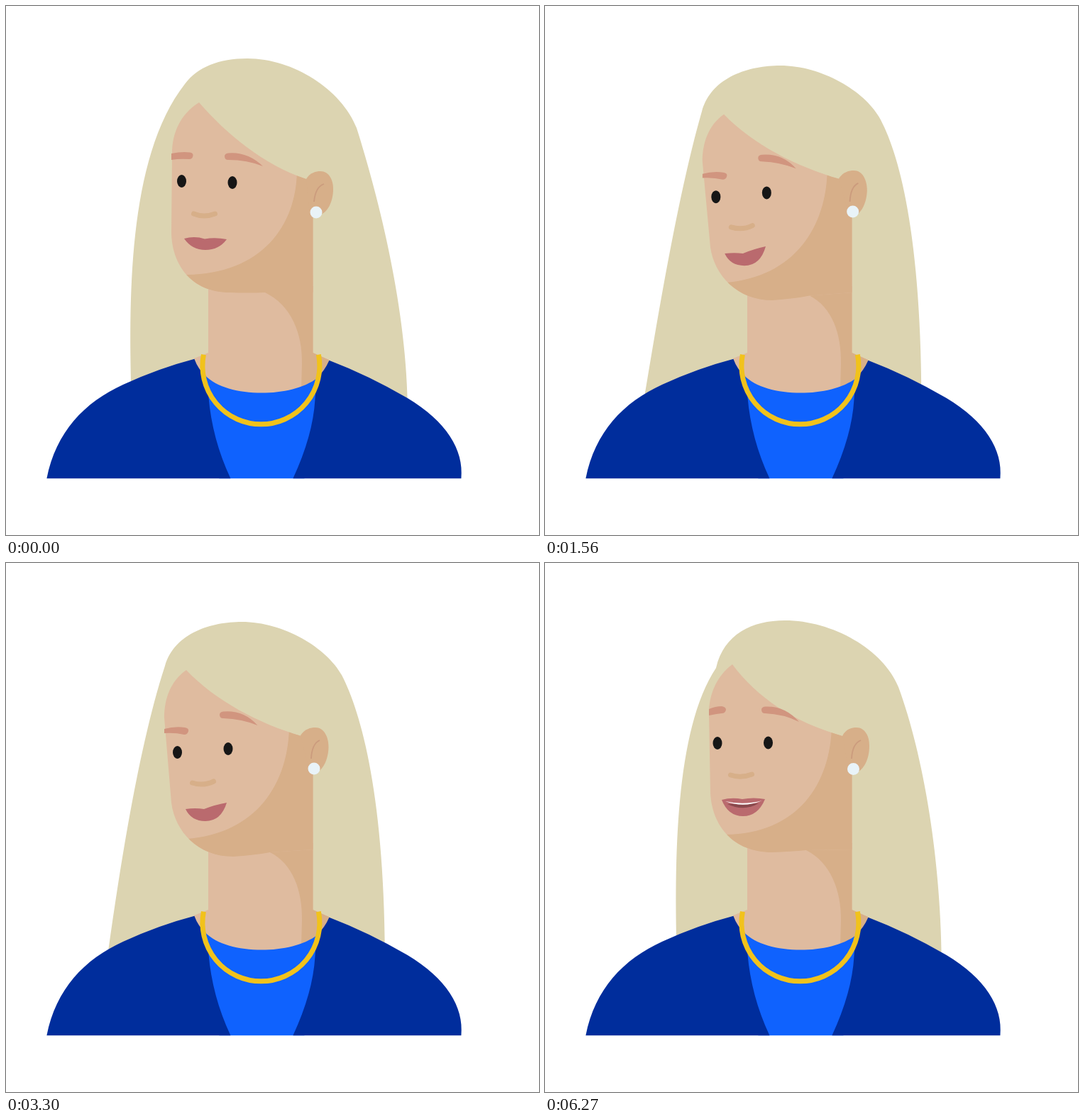
Animation, 751 px wide and 746 px high, one loop 8 s. Source, as an HTML page with a canvas:

```html
<!DOCTYPE html>
<html lang="en">
<head>
<meta charset="utf-8">
<title>Portrait</title>
<style>
  html, body { margin: 0; width: 100%; height: 100%; overflow: hidden; background: #fff; }
  canvas { display: block; }
</style>
</head>
<body>
<canvas id="stage" width="751" height="746"></canvas>
<script>
const ctx = document.getElementById('stage').getContext('2d');
const LOOP = 8000, STEP = 30;

const HAIR = '#dcd4b1', SKIN = '#dfbb9f', SHADE = '#d7af89', BROW = '#d1957f', LIPS = '#ba6a6e',
  EYE = '#161616', PEARL = '#e9f3f8', JACKET = '#002d9c', SHIRT = '#0f62fe', GOLD = '#f1c21b';

// Each moving part: upright, nodding, lifted, and optionally nodding while speaking.
const parts = {
  hair: [
    'M177 560 C173 420 170 215 252 110 C270 86 300 74 340 74 C405 74 473 118 494 172 C525 270 566 430 566 575Z',
    'M142 563 C155 470 183 270 224 145 C238 98 290 83 332 83 C392 83 452 120 473 158 C500 210 535 330 534 575Z',
    'M186 560 C182 420 183 235 241 148 C252 100 292 81 338 81 C405 81 477 122 498 175 C533 270 559 420 559 575Z',
    'M142 563 C155 470 181 280 220 163 C228 100 288 83 331 83 C394 83 458 120 478 163 C505 217 537 335 534 575Z'],
  face: [
    'M272 136 C245 153 234 180 234 208 L233 318 C233 365 262 404 315 404 Q340 405 365 404 L432.5 404 L432.5 250 L423 244 C363 224 310 180 272 136Z',
    'M254 151 C231 167 223 193 223 218 L233 338 C238 378 270 414 320 414 Q350 412 372 408 L432.5 404 L432.5 250 L416 244 C355 226 295 194 254 151Z',
    'M264 143 C241 160 231 187 231 212 L233 324 C235 370 265 408 320 408 Q347 407 368 405 L432.5 404 L432.5 250 L419 244 C350 224 299 190 264 143Z'],
  faceShade: [
    'M254 379 C360 378 410 310 410 230 L440 230 L440 420 L240 420Z',
    'M254 389 C352 382 398 312 399 230 L440 230 L440 420 L240 420Z',
    'M254 383 C356 382 402 312 404 230 L440 230 L440 420 L240 420Z'],
  neckShade: [
    'M365 404 C402 422 418 462 417 505 L416 540 L470 540 L455 499 L432.5 489 L432.5 395Z',
    'M372 408 C404 424 418 462 417 505 L416 540 L470 540 L455 499 L432.5 489 L432.5 395Z',
    'M368 405 C402 422 418 462 417 505 L416 540 L470 540 L455 499 L432.5 489 L432.5 395Z'],
  ear: [
    'M423 244 C428 235 437 233 443 233 C455 233 461 245 461 258 C461 276 453 292 441 295 L428 296Z',
    'M415 243 C421 234 429 232 436 232 C448 232 454.5 245 454.5 260 C454 277 447 291 438 295 L428 296Z',
    'M419 244 C424 234 432 232 439 232 C451 232 457.5 245 457 258 C457 277 449 291 440 295 L428 296Z'],
  earFold: ['M434 276 Q436 255 448 251', 'M430 276 Q431 255 442 250', 'M432 276 Q433 255 445 250'],
  nose: ['M264.5 293 Q279 299 294.5 293', 'M262.5 310 Q278 315 292.5 308', 'M261.5 299 Q276 304 291.5 298'],
  leftBrow: [
    'M233 208 Q248 205 259 206.5 Q264 207 263.5 211 Q263 216 258 216 Q245 215 233 217Z',
    'M223 234 Q238 230 252 232 Q258 233 257 237 Q256 242 251 242 Q238 239 223 240Z',
    'M231 206 Q240 202 249 202 Q255 203 255 207 Q254 212 249 212 Q240 213 231 215Z',
    'M222 222 Q234 216 244 216.5 Q250 217 250 221 Q249 225 244 225.5 Q234 227 223 231Z'],
  rightBrow: [
    'M313 207.5 Q340 205 362 226 Q340 217 313 217 Q308 217 308 212 Q308 208 313 207.5Z',
    'M306 209.5 Q335 207 354.5 229 Q333 220 306 219 Q301 219 301 214 Q301 210 306 209.5Z',
    'M310 202.5 Q338 201 358 224 Q336 213 310 212 Q305 212 305 207 Q305 203 310 202.5Z',
    'M305 212.5 Q334 210 354.5 232 Q332 222 305 222 Q300 222 300 217 Q300 213 305 212.5Z'],
  mouth: [
    'M251 328 Q266 324 280 328.5 Q295 326 311 329 Q300 344 281 344 Q262 344 251 328Z',
    'M253 347 Q267 345 279 347 Q294 341 311 338 Q303 364 281 364 Q261 364 253 347Z',
    'M249 334 Q263 330 278 333 Q294 330 310 333 Q300 357 279 357 Q258 357 249 334Z',
    'M252 347 Q266 342 280 345 Q296 342 311 343 Q302 367 281 367 Q260 367 252 347Z'],
  mouthInside: [
    'M257 335 Q280 346 301 334Z', 'M258 352 Q281 361 303 349Z', 'M257 340 Q280 351 301 339Z'],
  teeth: [
    'M254 331 Q280 337 306 330 Q280 341 254 331Z',
    'M255 348 Q281 354 308 345 Q281 358 255 348Z',
    'M254 336 Q280 342 306 335 Q280 346 254 336Z'],
  leftEye: ['247.5 247', '241.5 267', '243 254', '240.3 268'],
  rightEye: ['319 249', '313 262', '314.5 253.5', '311.8 262.8'],
  pearl: ['437 291', '434 290', '434.5 290.5']
};

const still = {
  neck: 'M285 380 H432.5 V489 L455 499 L460 560 H270 L265 497 L285 489Z',
  shirt: 'M280 520 C310 552 400 553 438 524 L450 560 L420 665.5 H300 L275 540Z',
  leftJacket: 'M57 665.5 C70 600 110 558 165 533 Q215 510 265 497 Q270 511 281 521 L285 550 Q290 610 316 665.5Z',
  rightJacket: 'M455 499 Q510 520 565 552 C620 585 645 625 641 665.5 H404 Q432 605 435 555 L437 525 Q449 513 455 499Z',
  necklace: 'M278 491 A82.5 82.5 0 1 0 440 491'
};

// Tracks of [time, value], eased between neighbours.
const nodTrack = [[210, 0], [700, -.19], [1150, 1.17], [1680, 1.1], [2130, 1.1], [2430, .65], [3060, 1.24], [3300, 1]];
const liftTrack = [[3990, 0], [4450, -.36], [4790, 1.54], [5430, 1]];
const speakTrack = [[3990, 0], [4450, 1]];
const eyeTrack = [[750, 1], [885, .1], [1020, 1], [6000, 1], [6135, .1], [6270, 1]];

const mix = (a, b, k) => a + (b - a) * k;

function valueAt(track, t) {
  const next = track.findIndex(key => key[0] > t);
  if (next === 0) return track[0][1];
  if (next < 0) return track[track.length - 1][1];
  const [t0, v0] = track[next - 1], [t1, v1] = track[next];
  return mix(v0, v1, (1 - Math.cos(Math.PI * (t - t0) / (t1 - t0))) / 2);
}

const NUMBER = /[\d.]+/g;
const numbers = text => text.match(NUMBER).map(Number);
const poses = Object.fromEntries(
  Object.entries(parts).map(([name, shapes]) => [name, shapes.map(numbers)]));

function fill(path, color) {
  ctx.fillStyle = color;
  ctx.fill(new Path2D(path));
}

function stroke(path, color, width, cap = 'butt') {
  ctx.strokeStyle = color;
  ctx.lineWidth = width;
  ctx.lineCap = cap;
  ctx.stroke(new Path2D(path));
}

function drawEye([x, y], open) {
  const rx = 6.5, ry = 9, h = ry * open, w = rx * Math.sqrt(1 - open * open);
  fill(`M${x - w} ${y - h} H${x + w} A${rx} ${ry} 0 0 1 ${x + w} ${y + h}
    H${x - w} A${rx} ${ry} 0 0 1 ${x - w} ${y - h}Z`, EYE);
}

function draw(t) {
  const nod = valueAt(nodTrack, t), lift = valueAt(liftTrack, t);
  const speak = valueAt(speakTrack, t), open = valueAt(eyeTrack, t);

  const coords = name => {
    const [upright, low, lifted, talking = low] = poses[name];
    return upright.map((v, i) =>
      mix(mix(v, mix(low[i], talking[i], speak), nod), lifted[i], lift));
  };
  const shape = name => {
    const values = coords(name);
    let i = 0;
    return parts[name][0].replace(NUMBER, () => values[i++].toFixed(2));
  };

  ctx.fillStyle = '#fff';
  ctx.fillRect(0, 0, 751, 746);

  fill(shape('hair'), HAIR);
  fill(still.neck, SKIN);
  fill(shape('neckShade'), SHADE);

  const face = shape('face');
  fill(face, SKIN);
  ctx.save();
  ctx.clip(new Path2D(face));
  fill(shape('faceShade'), SHADE);
  ctx.restore();

  fill(shape('ear'), SHADE);
  stroke(shape('earFold'), '#cb9b7d', 1.8);
  const [px, py] = coords('pearl');
  fill(`M${px - 8.5} ${py} a8.5 8.5 0 1 0 17 0 a8.5 8.5 0 1 0 -17 0Z`, PEARL);

  fill(shape('leftBrow'), BROW);
  fill(shape('rightBrow'), BROW);
  drawEye(coords('leftEye'), open);
  drawEye(coords('rightEye'), open);
  stroke(shape('nose'), SHADE, 7, 'round');

  fill(shape('mouth'), LIPS);
  ctx.globalAlpha = speak;
  fill(shape('mouthInside'), '#8a494d');
  fill(shape('teeth'), '#fff');
  ctx.globalAlpha = 1;

  ctx.save();
  ctx.translate(.4, .7);
  fill(still.shirt, SHIRT);
  fill(still.leftJacket, JACKET);
  fill(still.rightJacket, JACKET);
  stroke(still.necklace, GOLD, 7);
  ctx.restore();
}

const start = performance.now();
function frame() {
  const t = (performance.now() - start) % LOOP;
  draw(Math.floor(t / STEP) * STEP);
  requestAnimationFrame(frame);
}
frame();
</script>
</body>
</html>
```
